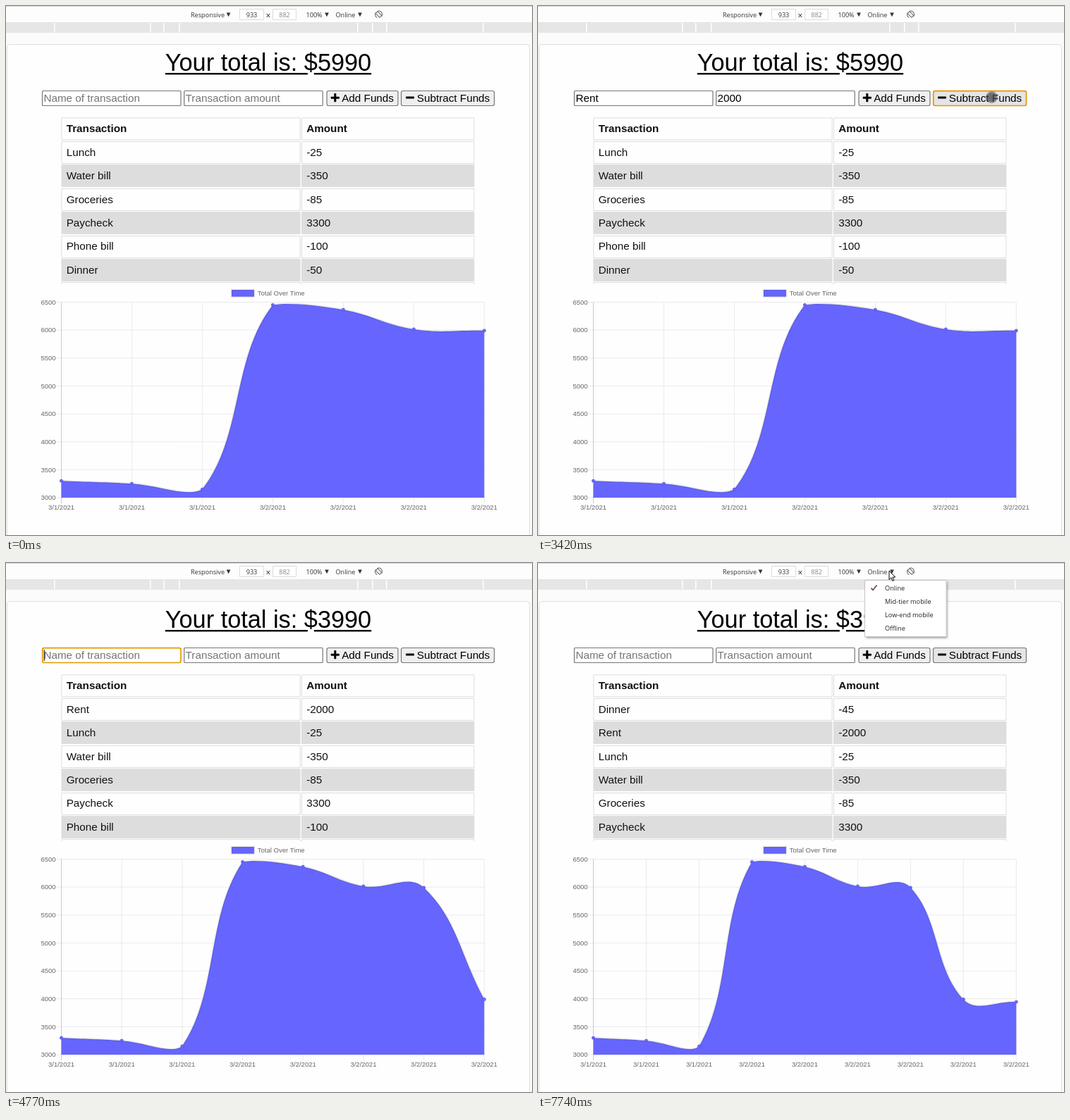
An HTML page with a canvas for the animation above (8 s loop, 746 by 751 pixels).

```html
<!DOCTYPE html>
<html lang="en">
<head>
<meta charset="utf-8">
<title>Budget tracker</title>
<style>
html, body { margin: 0; width: 100%; height: 100%; overflow: hidden; background: #fbfbfb; }
canvas { display: block; }
</style>
</head>
<body>
<canvas id="stage" width="746" height="751"></canvas>
<script>
const c = document.getElementById('stage').getContext('2d');
const LOOP = 8000;
const SANS = '"Liberation Sans", Arial, sans-serif';
const UI = '"Open Sans", "Noto Sans", sans-serif';
const BLUE = '#6666ff';

// Time line: each list holds [time, value], the latest value counts.
const nameKeys = [[0, ''], [1090, 'R'], [1170, 'Re'], [1420, 'Ren'], [1570, 'Rent'], [3740, ''],
  [4830, 'D'], [5060, 'Di'], [5140, 'Din'], [5390, 'Dinn'], [5540, 'Dinne'], [5620, 'Dinner'], [7100, '']];
const amountKeys = [[0, ''], [1880, '2'], [2110, '20'], [2180, '200'], [2350, '2000'], [3740, ''],
  [5930, '4'], [6160, '45'], [7100, '']];
const focusKeys = [[0, ''], [930, 'name'], [1880, 'amount'], [2730, 'sub'], [4770, 'name'],
  [5850, 'amount'], [6460, 'add'], [6550, 'sub'], [7580, '']];
const pressKeys = [[0, 0], [3420, 1], [3660, 0], [6780, 1], [7020, 0]];
const hoverKeys = [[0, 0], [2960, 1], [4000, 0], [6550, 1]];
const paths = [
  [[2960, 646, 126], [3120, 645, 128.5], [3270, 643.5, 129.5], [3740, 643.5, 129.5], [4220, 735, 144], [4450, 760, 148]],
  [[6550, 664, 130], [7100, 664, 130], [7580, 498, 11], [8000, 498, 11]]
];

const history = [['Dinner', '-45'], ['Rent', '-2000'], ['Lunch', '-25'], ['Water bill', '-350'],
  ['Groceries', '-85'], ['Paycheck', '3300'], ['Phone bill', '-100'], ['Dinner', '-50'], ['', '']];
const totals = [3300, 3250, 3150, 6450, 6365, 6015, 5990, 3990, 3945];
// Each update redraws the chart from its base line, in steps.
const updates = [3500, 6780];
const STEP = 80, HEAD = 38, GROW = 1000;

const at = (keys, t) => keys.reduce((v, k) => k[0] <= t ? k[1] : v, keys[0][1]);
const clamp = (v, a, b) => Math.min(b, Math.max(a, v));
const mix = (a, b, u) => a + (b - a) * u;

function text(s, x, y, size, color = '#000', { font = SANS, align = 'left', weight = '' } = {}) {
  c.font = `${weight} ${size}px ${font}`;
  c.textAlign = align;
  c.fillStyle = color;
  c.fillText(s, x, y);
}

function rect(x, y, w, h, color) {
  c.fillStyle = color;
  c.fillRect(x, y, w, h);
}

function box(x, y, w, h, r, fill, line, width = 1) {
  c.beginPath();
  c.roundRect(x, y, w, h, r);
  if (fill) { c.fillStyle = fill; c.fill(); }
  if (line) { c.strokeStyle = line; c.lineWidth = width; c.stroke(); }
}

function segment(x1, y1, x2, y2, color, width) {
  c.beginPath();
  c.moveTo(x1, y1);
  c.lineTo(x2, y2);
  c.strokeStyle = color;
  c.lineWidth = width;
  c.stroke();
}

function polygon(points, fill, line) {
  c.beginPath();
  points.forEach(p => c.lineTo(p[0], p[1]));
  c.closePath();
  c.fillStyle = fill;
  c.fill();
  if (line) { c.strokeStyle = line; c.lineWidth = 1; c.stroke(); }
}

function toolbar() {
  const label = (s, x, color = '#333', align) => text(s, x, 16, 9.1, color, { font: UI, align });
  const caret = x => polygon([[x - 2.9, 9.6], [x + 2.9, 9.6], [x, 15.2]], '#333');
  rect(0, 0, 746, 24, '#fdfdfd');
  rect(0, 0, 746, 1, '#d4d4d4');
  rect(0, 23, 746, 1, '#e4e4e4');
  rect(0, 24, 746, 14, '#e6e6e6');
  for (const x of [68, 204, 223, 245, 498, 519, 539, 676]) rect(x, 24, 1.5, 13, '#fff');
  label('Responsive', 262);
  caret(315.5);
  box(331.5, 4.5, 34, 15, 0, '#fff', '#dcdcdc');
  label('933', 348.5, '#333', 'center');
  text('×', 372, 17.5, 12, '#333', { font: UI, align: 'center' });
  box(378.5, 4.5, 33, 15, 0, '#fff', '#dcdcdc');
  label('882', 395, '#888', 'center');
  label('100%', 425.5);
  caret(455);
  label('Online', 467.5);
  caret(502);
  c.save();
  c.translate(528.5, 12);
  c.rotate(-Math.PI / 4);
  box(-2, -4, 4, 8, 1, null, '#666', 1);
  c.beginPath();
  c.arc(0, 0, 5, -1.2, 1.4);
  c.moveTo(-4.7, 1.7);
  c.arc(0, 0, 5, Math.PI - 0.35, Math.PI + 1.4);
  c.stroke();
  c.restore();
}

function title(total) {
  const s = 'Your total is: $', size = 34.3, y = 92;
  c.font = `${size}px ${SANS}`;
  const w = c.measureText(s + total).width;
  const x = 372 - w / 2;
  const gap = x + c.measureText(s).width - size * 0.278;
  text(s + total, x, y, size);
  rect(x, 95, gap - 4.5 - x, 2.4, '#000');
  rect(gap + 4.5, 95, x + w - gap - 4.5, 2.4, '#000');
}

function frame(x, w, r, fill, focused) {
  if (focused) box(x + 0.7, 120.7, w - 1.2, 20.8, 2.5, fill, '#e59700', 1.7);
  else box(x + 0.5, 120.5, w - 1, 21, r, fill, '#767676', 1.2);
}

function input(x, value, hint, focused) {
  const tx = x + 2.4;
  frame(x, 197.5, 1, '#fff', focused);
  text(value || hint, tx, 136, 15.25, value ? '#000' : '#757575');
  if (focused) rect(tx + c.measureText(value).width + 0.3, 123, 1, 16, '#000');
}

function form(t) {
  const focus = at(focusKeys, t);
  input(51, at(nameKeys, t), 'Name of transaction', focus === 'name');
  input(252.2, at(amountKeys, t), 'Transaction amount', focus === 'amount');
  frame(454.5, 102, 2.5, '#efefef', focus === 'add');
  box(460.7, 128.7, 12.2, 3, 0.8, '#000');
  box(465.3, 124.1, 3, 12.2, 0.8, '#000');
  text('Add Funds', 476.2, 136, 15.25);
  frame(560, 133, 2.5, at(hoverKeys, t) ? '#e5e5e5' : '#efefef', focus === 'sub');
  box(567, 128.5, 12, 3, 0.8, '#000');
  text('Subtract Funds', 582.8, 136, 15.25);
}

function table(first) {
  c.save();
  c.beginPath();
  c.rect(70, 150, 610, 245);
  c.clip();
  for (let k = 0; k < 8; k++) {
    const y = 158.6 + 33.4 * k;
    const cells = k ? history[first + k - 1] || ['', ''] : ['Transaction', 'Amount'];
    [[78.5, 339], [419, 245.3]].forEach(([x, w], i) => {
      const top = Math.round(y) + 0.5 - (k ? 0 : 0.5);
      box(x + 0.4, top - 0.1, w - 0.8, 31, 0, k && k % 2 === 0 ? '#ddd' : '#fefefe', '#ddd', 1);
      text(cells[i], x + 7.2, 179.4 + 33.4 * k, 15.25, '#111', { weight: k ? '' : 'bold' });
    });
  }
  c.restore();
}

const LEFT = 78.5, RIGHT = 678.3, TOP = 420.5, BASE = 698;

// Smooth curve handles, tension 0.4, kept inside the plot area.
function handles(pts) {
  return pts.map((p, i) => {
    const a = pts[i - 1] || p, b = pts[i + 1] || p;
    const d1 = Math.hypot(p.x - a.x, p.y - a.y), d2 = Math.hypot(b.x - p.x, b.y - p.y);
    const k1 = 0.4 * d1 / (d1 + d2), k2 = 0.4 * d2 / (d1 + d2);
    const handle = k => ({
      x: clamp(p.x + k * (b.x - a.x), LEFT, RIGHT),
      y: clamp(p.y + k * (b.y - a.y), TOP, BASE)
    });
    return { p, before: handle(-k1), after: handle(k2) };
  });
}

// Points and handles both travel from the flat curve to the full one.
function growing(pts, u) {
  const flat = handles(pts.map(p => ({ x: p.x, y: BASE })));
  const move = (a, b) => ({ x: mix(a.x, b.x, u), y: mix(a.y, b.y, u) });
  return handles(pts).map((n, i) => ({
    p: move(flat[i].p, n.p),
    before: move(flat[i].before, n.before),
    after: move(flat[i].after, n.after)
  }));
}

function chart(count, grow) {
  const grid = 'rgba(0,0,0,0.1)', grey = '#666';
  box(320, 403, 31.8, 9.6, 0, BLUE, grid, 2.4);
  text('Total Over Time', 356.8, 411.2, 9.53, grey);

  for (let i = 0; i <= 7; i++) {
    const y = TOP + (BASE - TOP) * i / 7;
    segment(LEFT - 8, y, RIGHT, y, grid, 0.8);
    text(6500 - 500 * i, 70.6, y + 3.2, 9.53, grey, { align: 'right' });
  }
  const pts = totals.slice(0, count).map((v, i) => ({
    x: LEFT + (RIGHT - LEFT) * i / (count - 1),
    y: BASE - (v - 3000) / 3500 * (BASE - TOP)
  }));
  pts.forEach((p, i) => {
    segment(p.x, TOP, p.x, BASE + 8, i ? grid : 'rgba(0,0,0,0.25)', 0.8);
    text(i < 3 ? '3/1/2021' : '3/2/2021', p.x, 714.5, 9.53, grey, { align: 'center' });
  });

  const curve = growing(pts, grow);
  const trace = () => {
    c.beginPath();
    curve.forEach(({ p, before }, i) => {
      if (!i) return c.moveTo(p.x, p.y);
      const { after } = curve[i - 1];
      c.bezierCurveTo(after.x, after.y, before.x, before.y, p.x, p.y);
    });
  };
  trace();
  c.lineTo(RIGHT, BASE);
  c.lineTo(LEFT, BASE);
  c.closePath();
  c.fillStyle = BLUE;
  c.fill();
  trace();
  c.strokeStyle = grid;
  c.lineWidth = 2.4;
  c.stroke();
  for (const { p } of curve) {
    c.beginPath();
    c.arc(p.x, p.y, 2.4, 0, 7);
    c.fillStyle = BLUE;
    c.fill();
    c.lineWidth = 0.8;
    c.stroke();
  }
}

function menu() {
  c.save();
  c.shadowColor = 'rgba(0,0,0,0.4)';
  c.shadowBlur = 3;
  c.shadowOffsetX = c.shadowOffsetY = 1.5;
  rect(463, 24, 116.5, 81, '#fff');
  c.restore();
  box(463.5, 24.5, 115.5, 80, 0, null, '#c4c4c4', 1);
  ['Online', 'Mid-tier mobile', 'Low-end mobile', 'Offline'].forEach((s, i) =>
    text(s, 492, 39 + 19 * i, 9.2, '#222', { font: UI }));
  c.beginPath();
  c.moveTo(472.5, 35.5);
  c.lineTo(475, 38.5);
  c.lineTo(480.5, 31.5);
  c.strokeStyle = '#5a3038';
  c.lineWidth = 1.4;
  c.stroke();
}

function arrow(x, y) {
  const shape = [[0, 0], [0, 12.5], [2.9, 9.9], [4.9, 14.4], [6.8, 13.5], [4.9, 9.2], [8.7, 9]];
  polygon(shape.map(p => [x + p[0], y + p[1]]), '#fff', '#000');
}

function pointer(t) {
  const path = paths.find(p => t >= p[0][0] && t < p[p.length - 1][0]);
  if (!path) return;
  const i = path.findIndex(k => k[0] > t);
  const [t0, x0, y0] = path[i - 1], [t1, x1, y1] = path[i];
  const u = (t - t0) / (t1 - t0), s = u * u * (3 - 2 * u);
  const x = mix(x0, x1, s), y = mix(y0, y1, s);
  if (t < 7740) {
    const tint = at(pressKeys, t) ? '70,70,80' : '190,190,20';
    const glow = c.createRadialGradient(x, y, 0, x, y, 9.5);
    glow.addColorStop(0, `rgba(${tint},0.8)`);
    glow.addColorStop(0.65, `rgba(${tint},0.72)`);
    glow.addColorStop(1, `rgba(${tint},0)`);
    c.beginPath();
    c.arc(x, y, 9.5, 0, 7);
    c.fillStyle = glow;
    c.fill();
  }
  if (t >= 7100 || (t > 3740 && t < 4450)) arrow(x, y);
}

function draw(t) {
  const done = updates.filter(time => t >= time);
  const count = 7 + done.length;
  let grow = 1;
  if (done.length) {
    const age = Math.floor((t - done[done.length - 1]) / STEP) * STEP + HEAD;
    grow = 1 - (1 - clamp(age / GROW, 0, 1)) ** 4;
  }
  rect(0, 0, 746, 751, '#fbfbfb');
  box(1.5, 54.5, 741, 710, 4, '#fefefe', '#dedede', 1);
  toolbar();
  title(totals[count - 1]);
  form(t);
  table(2 - done.length);
  chart(count, grow);
  if (t >= 7740) menu();
  pointer(t);
}

const start = performance.now();
function tick() {
  draw((performance.now() - start) % LOOP);
  requestAnimationFrame(tick);
}
tick();
</script>
</body>
</html>
```
